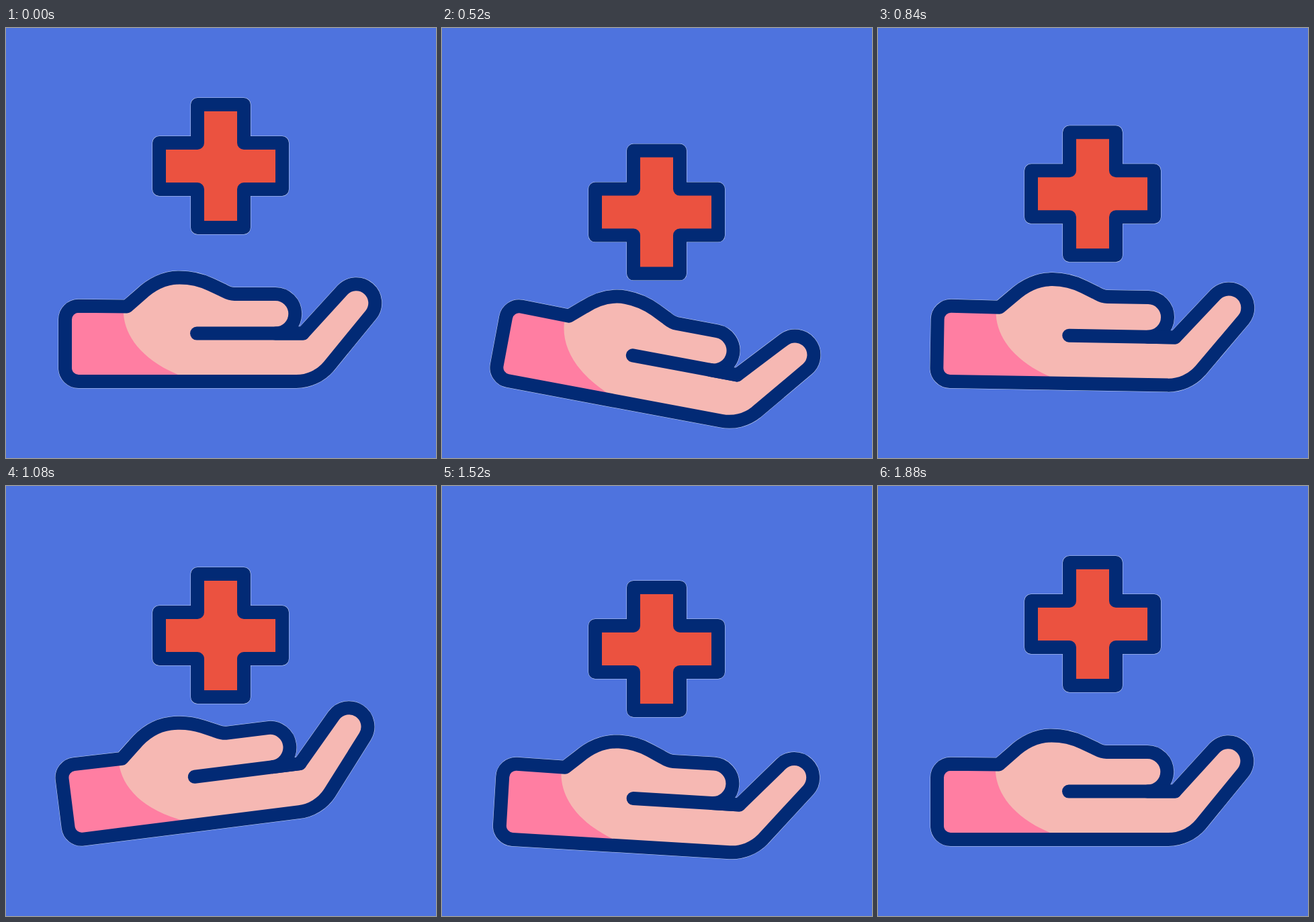
Write an HTML page that moves like this. It is 640x640 px and loops after 2000 ms.

```html
<!DOCTYPE html>
<html lang="en">
<head>
<meta charset="utf-8">
<title>Caring hand</title>
<style>
  html, body { margin: 0; width: 100%; height: 100%; overflow: hidden; background: #4e73de; }
  svg { display: block; width: 100%; height: 100%; }
  .line { fill: none; stroke: #022a75; stroke-width: 20; stroke-linejoin: round; stroke-linecap: round; }
  .rim { fill: none; stroke: #e2e8f6; stroke-width: 21; stroke-linejoin: round; stroke-opacity: .85; }
  .red { fill: #eb5240; }
  .skin { fill: #f6b8b3; }
  .sleeve { fill: #ff7ea2; }
</style>
</head>
<body>
<svg viewBox="0 0 640 640">
  <defs>
    <path id="plus" d="M285 114h69v57h57v69h-57v57h-69v-57h-57v-69h57z"/>
    <path id="palm" d="M108 413.7L180 414.4L200 397C217 381 236 371.5 258 371.5
      C275 371.5 292 375.7 305 382L322 390C328 393 332 396 340 396
      H401A29.3 29.3 0 0 1 401 454.6H442L500.9 390.1A28 28 0 0 1 543.3 426.6
      L480 504C468 518 450 526 432 526H108A20 20 0 0 1 88 506V433.7A20 20 0 0 1 108 413.7z"/>
  </defs>
  <g id="hand">
    <use href="#palm" class="rim"/>
    <use href="#palm" class="skin"/>
    <path class="sleeve" d="M175 414C172 450 195 490 256 516V526H108A20 20 0 0 1 88 506V434A20 20 0 0 1 108 414z"/>
    <use href="#palm" class="line"/>
    <path class="line" d="M284 454.6H442"/>
  </g>
  <g id="cross">
    <use href="#plus" class="rim"/>
    <use href="#plus" class="red"/>
    <use href="#plus" class="line"/>
  </g>
</svg>
<script>
  const LOOP = 2000, TICK = 40;
  const poses = [
    { at: 160, angle: 0, drop: 0 },
    { at: 565, angle: 11, drop: 71 },
    { at: 1080, angle: -7.16, drop: 17 },
    { at: 1395, angle: 4.08, drop: 44.2 },
    { at: 1880, angle: 0, drop: 0 }
  ];
  const hand = document.getElementById('hand');
  const cross = document.getElementById('cross');
  const start = performance.now();

  const smooth = p => p * p * (3 - 2 * p);
  const mix = (a, b, k) => a + (b - a) * k;

  function poseAt(time) {
    const next = poses.findIndex(pose => pose.at > time);
    if (next < 1) return poses[0];
    const a = poses[next - 1], b = poses[next];
    const k = smooth((time - a.at) / (b.at - a.at));
    return { angle: mix(a.angle, b.angle, k), drop: mix(a.drop, b.drop, k) };
  }

  function draw() {
    // The motion advances at 25 pictures per second.
    const elapsed = performance.now() - start + 1;
    const time = Math.floor(elapsed % LOOP / TICK) * TICK;
    const { angle, drop } = poseAt(time);
    hand.setAttribute('transform', `rotate(${angle} 108 470)`);
    cross.setAttribute('transform', `translate(0 ${drop})`);
    requestAnimationFrame(draw);
  }
  draw();
</script>
</body>
</html>
```
